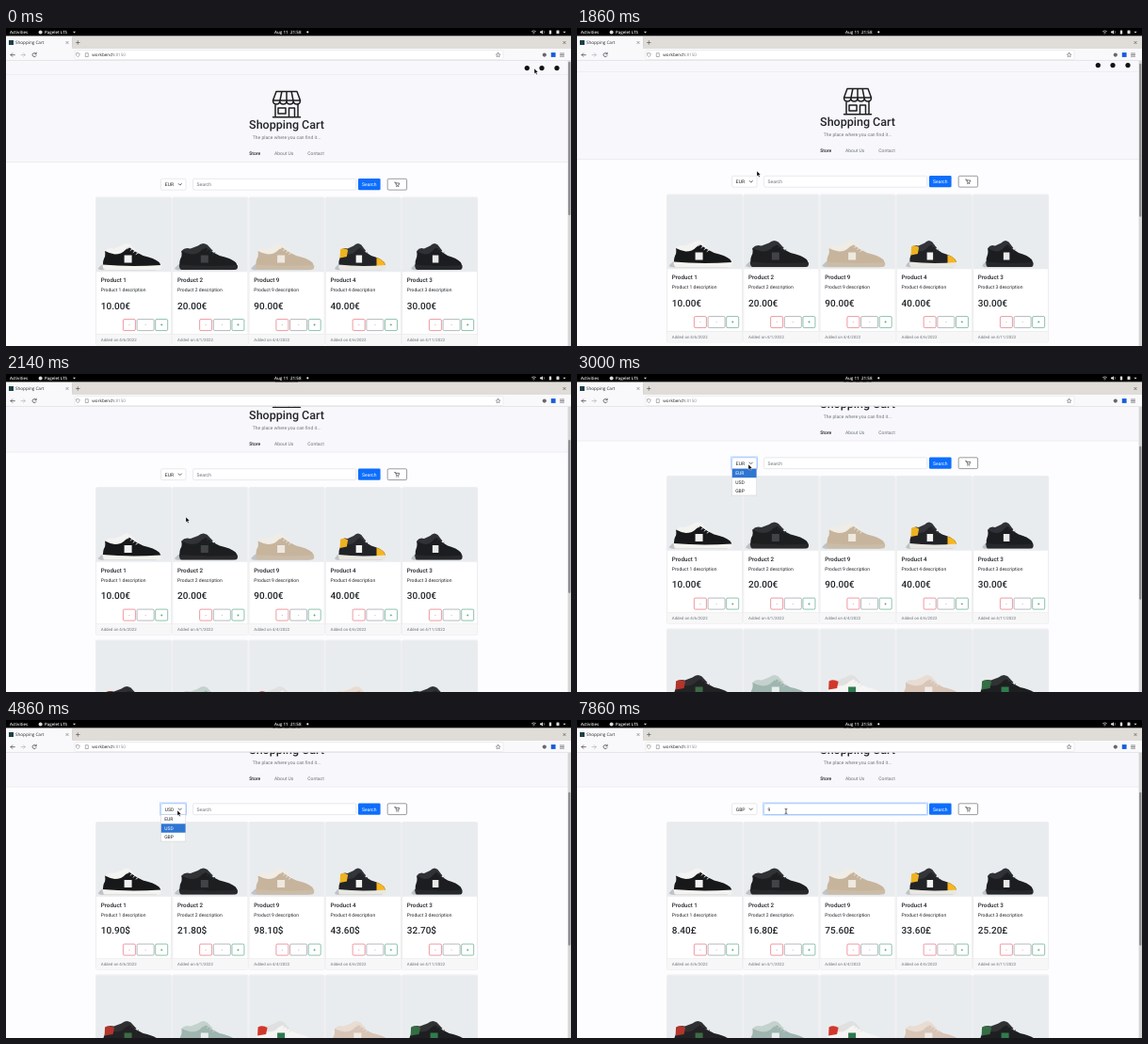
Recreate the animation shown at these times as an HTML page. Size 600 px wide and 338 px high, loop 8 s.

```html
<!DOCTYPE html>
<html lang="en">
<head>
<meta charset="utf-8">
<title>Shopping Cart</title>
<style>
  html, body { margin: 0; width: 100%; height: 100%; overflow: hidden; background: #fdfcfe; }
  svg { display: block; width: 100vw; height: 100vh; text-rendering: geometricPrecision; }
  text { font-family: Roboto, Arial, sans-serif; white-space: pre; }
  .ui text { font-family: "Open Sans", "Noto Sans", sans-serif; }
  .line { fill: none; stroke-linecap: round; stroke-linejoin: round; }
</style>
</head>
<body>
<svg id="stage" viewBox="0 0 600 338" preserveAspectRatio="none"></svg>
<script>
const LOOP = 8000, STEPS_PER_SECOND = 7;
const INK = '#212529', MUTED = '#6c757d', BLUE = '#0d6efd';

const rect = (x, y, w, h, fill, extra = '') =>
  `<rect x="${x}" y="${y}" width="${w}" height="${h}" fill="${fill}" ${extra}/>`;
const box = (x, y, w, h, stroke, fill = '#fff', extra = '') =>
  rect(x, y, w, h, fill, `rx="1.3" stroke="${stroke}" stroke-width=".5" ${extra}`);
const text = (x, y, size, fill, content, extra = '') =>
  `<text x="${x}" y="${y}" font-size="${size}" fill="${fill}" ${extra}>${content}</text>`;
const shape = (d, fill, extra = '') => `<path d="${d}" fill="${fill}" ${extra}/>`;
const line = (d, stroke, width = .7, extra = '') =>
  `<path class="line" d="${d}" stroke="${stroke}" stroke-width="${width}" ${extra}/>`;
const dot = (x, y, r, fill) => `<circle cx="${x}" cy="${y}" r="${r}" fill="${fill}"/>`;
const MIDDLE = 'text-anchor="middle" ';
const MEDIUM = 'font-weight="500" ';

const shoes = [
  { body: '#17181a', lining: '#f3f3f2', sole: '#f4f3ef', patch: '#f1f1f0' },
  { body: '#1d1e20', lining: '#313235', sole: '#29292b', patch: '#414347' },
  { body: '#c7b49d', lining: '#f0ece6', sole: '#cbbca8', patch: '#eee8df' },
  { body: '#222327', lining: '#33353a', sole: '#e9e7e2', patch: '#f3f3f1', heel: '#eeb321', toe: '#f5b51d', scale: .81 },
  { body: '#1c1d20', lining: '#303137', sole: '#27282b', patch: '#e8e8e8', scale: .81 },
  { body: '#222224', lining: '#303033', sole: '#1c1c1e', patch: '#3d6a45', heel: '#b3352b' },
  { body: '#9fb5af', lining: '#c3d2cd', sole: '#eef0ed', patch: '#e7eeeb' },
  { body: '#f5f5f3', lining: '#dfe0df', sole: '#f2f1ed', patch: '#2d7a4f', heel: '#d2372b' },
  { body: '#d8c5b8', lining: '#e8dcd3', sole: '#efe7de', patch: '#f2ebe5' },
  { body: '#1e1f21', lining: '#303234', sole: '#232426', patch: '#2f7d4e', heel: '#356d44' },
];

// A side view in card coordinates; scale narrows it around the middle
function shoe({ body, lining, sole, patch, heel, toe, scale = 1 }) {
  return `<g transform="translate(${(1 - scale) * 42} 0) scale(${scale} 1)">` +
    shape('M2 76 Q5 71 12 69 L66 75 L64 77.3 H5Z', '#8c9094', 'opacity=".45"') +
    shape('M9.5 57 Q13 52.5 19 54.5 L27 51.5 Q32 47 37 50.5 L43 57 L30 63 L11 62Z', lining) +
    shape('M7.5 73 Q7 67 9.5 63 Q10 60 9.5 57 Q14 59.5 20 60.5 Q27 60.5 31 56 L35 53 Q42 58.5 50 62 Q62 64.5 67 69 Q69 71 68.5 74Z', body) +
    (heel ? shape('M9.5 55.5 Q14 53 19.5 56 L18 63 L9 64.5Z', heel) : '') +
    (toe ? shape('M57 64 Q65 66 68.5 71 L68 73 H57Z', toe) : '') +
    line('M33.5 54.5 L36 52.5 M36.5 56.5 L39 54.5 M39.5 58.5 L42 56.5 M42.5 60.5 L45 58.8', lining, .9) +
    rect(30, 61.5, 8, 8, patch) +
    shape('M7 71.5 Q35 74 69 72 Q70 77 66 77 H10 Q7 77 7 71.5Z', sole) + '</g>';
}

const products = [
  ['Product 1', 10, '4/6'], ['Product 2', 20, '4/1'], ['Product 9', 90, '4/4'],
  ['Product 4', 40, '4/6'], ['Product 3', 30, '4/11'],
];
const currencies = {
  EUR: { rate: 1, sign: '€' }, USD: { rate: 1.09, sign: '$' }, GBP: { rate: .84, sign: '£' },
};

const button = (x, w, color, label) =>
  box(x, 129.6, w, 12, color) + text(x + w / 2, 137.3, 5, color, label, MIDDLE);

function card(i) {
  const [name, , date] = products[i % 5];
  const x = 95.6 + 81.25 * (i % 5), y = 180 + 162.5 * Math.floor(i / 5);
  return `<g transform="translate(${x} ${y})">` +
    box(0, 0, 80, 157, '#dcdddf') +
    rect(.25, .25, 79.5, 79, '#e9ecee') + shoe(shoes[i]) +
    text(5.2, 90.4, 6.25, INK, name, MEDIUM) +
    text(5.2, 100.2, 5, INK, name + ' description') +
    text(5.2, 118.5, 10, INK, '', i < 5 ? MEDIUM + 'class="price"' : '') +
    button(28.8, 13, '#dc3545', '-') + button(43.5, 18, MUTED, '-') +
    button(63.1, 13, '#198754', '+') +
    rect(.25, 145.2, 79.5, 11.6, '#f7f7f8') + rect(0, 145, 80, .4, '#dcdddf') +
    text(5.2, 152.6, 4.375, MUTED, `Added on ${date}/2022`) + '</g>';
}

const storeIcon = line(
  'M287 67.5 H309 L312.5 77 Q312.5 81 308.8 81 Q305.4 81 305.2 77.5 Q305 81 301.6 81 Q298.2 81 298 77.5' +
  'Q297.8 81 294.4 81 Q291 81 290.8 77.5 Q290.6 81 287.2 81 Q283.5 81 283.5 77 Z M283.7 77 H312.3' +
  'M291 77 L292.8 68 M298 77 V68 M305 77 L303.2 68 M286 81 V94.5 M310 81 V94.5 M283.5 94.7 H312.5' +
  'M289 85 H297 V91 H289Z M300.5 94.5 V85 H306.5 V94.5', '#1d1e20', 1.5);

const page =
  rect(0, 34, 597, 108.5, '#f8f7fb') + rect(0, 49, 597, .5, '#e4e3e8') + rect(0, 142.3, 597, .5, '#dfdee4') +
  [553.3, 569, 585].map(x => dot(x, 42.6, 2.6, '#111')).join('') + storeIcon +
  text(298, 107, 12.5, INK, 'Shopping Cart', MIDDLE + MEDIUM) +
  text(298, 118, 5, MUTED, 'The place where you can find it...', MIDDLE) +
  text(258.3, 135.4, 5, INK, 'Store', MEDIUM) +
  text(285, 135.4, 5, MUTED, 'About Us') + text(320.3, 135.4, 5, MUTED, 'Contact') +
  box(164.6, 160.3, 26.4, 11.8, '#ced4da', '#fff', 'id="select"') +
  text(168.8, 168, 5, INK, '', 'id="currency"') + line('M183.2 165.5 L184.8 167.1 L186.4 165.5', '#343a40', .8) +
  box(198.7, 160.3, 173, 11.8, '#ced4da', '#fff', 'id="search"') +
  text(202.6, 168, 5, MUTED, '', 'id="query"') +
  rect(374, 160, 23.6, 12.3, BLUE, 'rx="1.3"') + text(385.8, 168, 5, '#fff', 'Search', MIDDLE) +
  box(405.2, 160.3, 20.4, 11.8, '#343a40') +
  line('M412.6 164 H413.7 L414.6 167.3 H417 L417.7 164.9 H414', INK, .6) +
  dot(414.8, 168.6, .5, INK) + dot(416.8, 168.6, .5, INK) +
  shoes.map((_, i) => card(i)).join('');

const menu = `<g id="menu">` + rect(164.6, 100.6, 26.2, 28.4, '#fff', 'stroke="#c4c6c9" stroke-width=".4"') +
  rect(164.8, 100.8, 25.8, 9.4, '#2f76d2', 'id="highlight"') +
  Object.keys(currencies).map((c, i) => text(168.2, 107.4 + 9.5 * i, 5, INK, c, 'class="option"')).join('') + '</g>';

const chrome = '<g class="ui">' +
  rect(0, 0, 600, 8.6, '#000') +
  text(4, 5.9, 4.4, '#eee', 'Activities', 'font-weight="600"') + dot(36.6, 4.4, 2, '#ddd') +
  text(41, 5.9, 4.4, '#eee', 'Pagelet LTS', 'font-weight="600"') +
  shape('M71 3.7 H74 L72.5 5.5Z', '#ddd') +
  text(285, 5.9, 4.5, '#eee', 'Aug 11  21:58', 'font-weight="600"') + dot(320.3, 4.3, 1.1, '#eee') +
  line('M558.5 3.5 Q560.5 2 562.5 3.5 M559.5 4.8 Q560.5 4 561.5 4.8 M560.5 6 V6.1', '#ddd') +
  shape('M567 3.5 H568.3 L570 2.2 V6.5 L568.3 5.3 H567Z', '#ddd') +
  line('M571.2 3.3 Q572 4.4 571.2 5.5', '#ddd', .5) +
  rect(576.8, 2.5, 2.4, 4, '#ddd', 'rx=".4"') + rect(584.5, 2.5, 3, 3.6, '#ddd', 'rx=".5"') +
  shape('M591.5 3.7 H594.5 L593 5.5Z', '#ddd') +
  rect(0, 8.6, 600, 13.4, '#e0ddd9') + rect(0, 9, 70, 13, '#f9f9fb') + rect(70, 11, .4, 9, '#c7c4c0') +
  rect(3, 13, 5, 5, '#1c4047') + text(10, 17.2, 4.6, '#2b2b30', 'Shopping Cart') +
  line('M63.8 14.3 L66.2 16.7 M66.2 14.3 L63.8 16.7', '#55555a', .5) +
  line('M74.5 15.5 H78.1 M76.3 13.7 V17.3', '#44444a', .6) +
  line('M591.8 14.3 L594.2 16.7 M594.2 14.3 L591.8 16.7', '#44444a', .6) +
  rect(0, 22, 600, 12.5, '#f9f9fb') + rect(0, 34.2, 600, .5, '#d2d2d6') +
  line('M9.3 28.6 H5 M6.8 26.8 L5 28.6 L6.8 30.4', '#3f3f46') +
  line('M16 28.6 H20.3 M18.5 26.8 L20.3 28.6 L18.5 30.4', '#b4b4b9') +
  line('M32 27.4 A2.1 2.1 0 1 0 32.1 29.5 M32.2 26.2 V27.7 H30.7', '#3f3f46') +
  box(73, 23.7, 455, 9.8, '#dcdce0') +
  line('M76.3 26.5 L78.2 27.2 Q78.2 29.8 76.3 30.8 Q74.4 29.8 74.4 27.2Z', '#66666d', .5) +
  line('M84.7 26.7 H87.3 V30.5 H84.7Z', '#66666d', .5) +
  text(91.3, 30.2, 4.6, '#222', 'workbench<tspan fill="#88888f">:8150</tspan>') +
  line('M522.6 26.2 L523.3 27.8 L525 28 L523.7 29.1 L524.1 30.8 L522.6 29.9 L521.1 30.8 L521.5 29.1 L520.2 28 L521.9 27.8Z', '#55555c', .5) +
  dot(571.8, 28.6, 2.1, '#66666d') + rect(578.8, 26.1, 4.8, 4.8, '#175ddc') +
  line('M588.5 27 H592.5 M588.5 28.6 H592.5 M588.5 30.2 H592.5', '#44444a', .6) + '</g>';

const pointers =
  shape('M0 0 V5.6 L1.3 4.5 L2.2 6.5 L3.2 6 L2.3 4.1 L4 4Z', '#000', 'id="arrow" stroke="#fff" stroke-width=".4"') +
  line('M-1 -2.7 Q0 -2.7 0 -2 V2 Q0 2.7 -1 2.7 M1 -2.7 Q0 -2.7 0 -2 M0 2 Q0 2.7 1 2.7', '#111', .6, 'id="beam"');

const stage = document.getElementById('stage');
stage.innerHTML = rect(0, 0, 600, 338, '#fdfcfe') + `<g id="page">${page}</g>` +
  rect(596.6, 34.5, 3.4, 303.5, '#d6d6d6') + rect(597.1, 36, 2.3, 163, '#8c8c8e', 'id="thumb" rx="1.1"') +
  chrome + menu + pointers;

const $ = id => document.getElementById(id);
const prices = [...stage.querySelectorAll('.price')];
const options = [...stage.querySelectorAll('.option')];
const set = (id, attrs) => Object.entries(attrs).forEach(([k, v]) => $(id).setAttribute(k, v));
const show = (id, visible) => set(id, { visibility: visible ? 'visible' : 'hidden' });

// Pointer stops: step, x, y
const path = [
  [0, 561, 43], [8, 196, 149], [11, 191, 152], [17, 191, 152], [20, 182, 96], [22, 182, 96],
  [24, 182, 115], [27, 182, 115], [29, 178, 102], [31, 178, 102], [33, 182, 96], [35, 182, 96],
  [37, 182, 125], [39, 182, 125], [40, 205.5, 108.7], [43, 222, 97], [56, 222, 97],
];
const scrolls = [3, 32, 59.5, 71.5];

function pointerAt(step) {
  const i = path.findIndex(p => p[0] > step);
  const [s0, x0, y0] = path[i - 1], [s1, x1, y1] = path[i];
  const u = (step - s0) / (s1 - s0), e = u * u * (3 - 2 * u);
  return [x0 + (x1 - x0) * e, y0 + (y1 - y0) * e];
}

function focus(id, on) {
  set(id, {
    stroke: on ? '#86b7fe' : '#ced4da',
    style: on ? 'outline:1.25px solid rgba(13,110,253,.25);stroke-width:.6' : '',
  });
}

function render(time) {
  const step = Math.floor((time + 4) * STEPS_PER_SECOND / 1000) % 56;
  const [x, y] = pointerAt(step);
  const scroll = step < 13 ? 0 : scrolls[Math.min(step - 13, 3)];
  const names = Object.keys(currencies);
  const current = step < 27 ? 0 : step < 39 ? 1 : 2;
  const { rate, sign } = currencies[names[current]];

  set('page', { transform: `translate(0 ${-scroll})` });
  set('thumb', { y: 36 + scroll * .57 });
  $('currency').textContent = names[current];
  prices.forEach((p, i) => p.textContent = (products[i][1] * rate).toFixed(2) + sign);

  const hovered = y < 100.6 ? current : Math.min(2, Math.floor((y - 100.6) / 9.5));
  show('menu', (step >= 20 && step < 27) || (step >= 34 && step < 39));
  set('highlight', { y: 100.8 + 9.5 * hovered });
  options.forEach((o, i) => o.setAttribute('fill', i === hovered ? '#fff' : INK));

  const typed = step >= 55;
  focus('select', step >= 20 && step < 47);
  focus('search', step >= 47);
  $('query').textContent = typed ? '9' : 'Search';
  set('query', { fill: typed ? INK : MUTED });

  const overInput = step >= 43;
  show('arrow', !overInput);
  show('beam', overInput);
  set(overInput ? 'beam' : 'arrow', { transform: `translate(${x} ${y})` });
}

const start = performance.now();
function tick() {
  render((performance.now() - start) % LOOP);
  requestAnimationFrame(tick);
}
tick();
</script>
</body>
</html>
```
